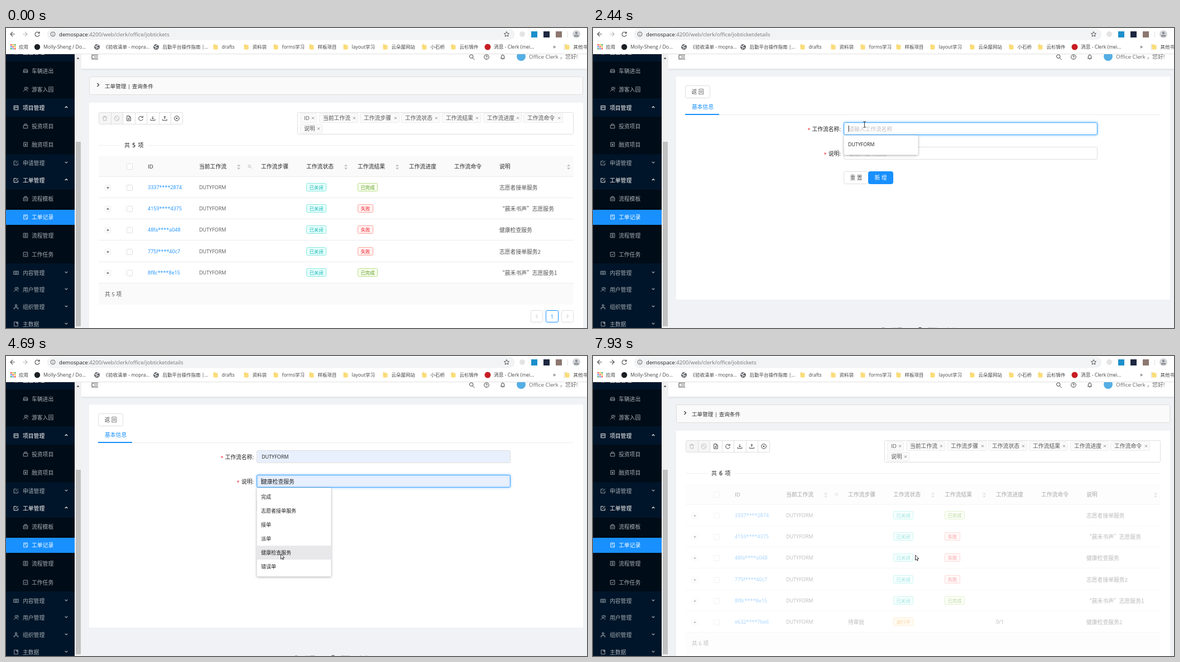
An HTML page with a canvas for the animation above (8000 ms loop, 1041x538 px).

```html
<!DOCTYPE html>
<html lang="zh">
<head>
<meta charset="utf-8">
<title>工单管理</title>
<style>
html, body { margin: 0; width: 100%; height: 100%; overflow: hidden; background: #fff; }
canvas { display: block; width: 1041px; height: 538px; }
</style>
</head>
<body>
<canvas id="stage" width="1041" height="538"></canvas>
<script>
const ctx = document.getElementById('stage').getContext('2d');
const LOOP = 8000, STEP = 77;
const BLUE = '#1890ff', LIGHT_BLUE = '#40a9ff', FILLED = '#e8f0fe';
const LINE = '#dedede', SOFT_LINE = '#ececec';
const LATIN = '"Open Sans"', CJK = '"Noto Sans CJK SC", "Noto Sans CJK"';

// Outline icons, drawn around their centre.
const ICONS = {
  back: 'M4 0H-4M0-4L-4 0L0 4',
  forward: 'M-4 0H4M0-4L4 0L0 4',
  reload: 'M3.4-2A4 4 0 1 0 4 1M4-4.5V-1.5H1',
  info: 'M4 0A4 4 0 1 1-4 0A4 4 0 1 1 4 0M0-.5V2.3M0-2.3V-1.4',
  star: 'M0-4.5L1.3-1.5L4.5-1.2L2.1 1L2.8 4.2L0 2.5L-2.8 4.2L-2.1 1L-4.5-1.2L-1.3-1.5Z',
  search: 'M2-1A3.2 3.2 0 1 1-4.4-1A3.2 3.2 0 1 1 2-1M1 1.5L4.5 5',
  help: 'M4.5 0A4.5 4.5 0 1 1-4.5 0A4.5 4.5 0 1 1 4.5 0M-1.4-1A1.4 1.4 0 1 1 0 .6V1.3M0 2.2V2.9',
  bell: 'M-4 3H4M-3 3V-1A3 3 0 0 1 3-1V3M-1 4.5H1M0-5V-4',
  fold: 'M-6-3.5H6M-1.5 0H6M-6 3.5H6M-3.5-1.8L-6 0L-3.5 1.8',
  trash: 'M-4-2.5H4M-3-2.5L-2.5 4H2.5L3-2.5M-1.5-2.5V-4H1.5V-2.5',
  ban: 'M4.5 0A4.5 4.5 0 1 1-4.5 0A4.5 4.5 0 1 1 4.5 0M-3-3L3 3',
  add: 'M-3.5-4.5H1L3.5-2V4.5H-3.5ZM1-4.5V-2H3.5M-1.8 1.2H1.8M0-.6V3',
  download: 'M-4 1.5V4H4V1.5M0-4V1.5M-2-.5L0 1.5L2-.5',
  upload: 'M-4 1.5V4H4V1.5M0 1.5V-4M-2-2L0-4L2-2',
  close: 'M4.5 0A4.5 4.5 0 1 1-4.5 0A4.5 4.5 0 1 1 4.5 0M-1.6-1.6L1.6 1.6M1.6-1.6L-1.6 1.6',
  cross: 'M-2.2-2.2L2.2 2.2M2.2-2.2L-2.2 2.2',
  plus: 'M-2 0H2M0-2V2',
  up: 'M-2.3 1.2L0-1.2L2.3 1.2',
  down: 'M-2.3-1.2L0 1.2L2.3-1.2',
  left: 'M1.5-3L-1.5 0L1.5 3',
  right: 'M-1.5-3L1.5 0L-1.5 3',
  car: 'M-4 3V0L-3-3H3L4 0V3ZM-4 0H4M-2.5 1.5H-1.5M1.5 1.5H2.5',
  user: 'M2-2A2 2 0 1 1-2-2A2 2 0 1 1 2-2M-4 4C-3 0 3 0 4 4M2-4A2 2 0 0 1 3 0',
  board: 'M-4-3.8H4V3.8H-4ZM-2-2V2M0-2V0M2-2V1',
  bag: 'M-4-1.5H4V4H-4ZM-2-1.5V-4H2V-1.5',
  money: 'M-3.5-4H3.5V3.5H-3.5ZM-1.7-2L0 0L1.7-2M0 0V2.3M-1.5.7H1.5',
  edit: 'M1-3.5H-4V4H3.5V0M-1 1L4-4',
  box: 'M-4-2H4V4H-4ZM-2-2V-4H2V-2M-2 0V2M0 0V2M2 0V2',
  log: 'M-3.5-4H3.5V4H-3.5ZM-1.7-2H1.7M-1.7 0H0M1 1L3 3',
  list: 'M-4-4H4V4H-4ZM-2-2H2M-2 0H2M-2 2H2',
  check: 'M-4-4H4V4H-4ZM-2 0L-.5 1.5L2-1.5',
  book: 'M0-3H-4.5V3H4.5V-3H0V3M-3-1H-1.5M1.5-1H3M-3 1H-1.5M1.5 1H3',
  tree: 'M-1.5-4H1.5V-1H-1.5ZM0-1V1.5M-3.5 4V1.5H3.5V4M-4.5 4H-2.5M2.5 4H4.5',
  file: 'M-3.5-4H3.5V4H-3.5ZM1-4V-1H2.5V-4'
};
for (const name in ICONS) ICONS[name] = new Path2D(ICONS[name]);

const ARROW = new Path2D('M0 0V9.2L2.1 7.2L3.4 10.2L4.8 9.6L3.5 6.6H6.4Z');
const HAND = new Path2D('M-1 1Q0-.8 1 1V5L4.6 6Q5.8 6.4 5.5 8L4.6 10.5V12.2H-1V10.5L-3.6 7.3Q-3.2 5.8-1 7.6Z');

function text(s, x, y, color = '#555', size = 9.8, weight = 400, align = 'left') {
  const family = /“/.test(s) ? [CJK, LATIN] : [LATIN, CJK];
  ctx.font = `${weight} ${size}px ${family.join(', ')}, sans-serif`;
  ctx.textAlign = align;
  ctx.fillStyle = color;
  ctx.fillText(s, x, y + size * 0.37);
  return ctx.measureText(s).width;
}

function rect(x, y, w, h, color) {
  ctx.fillStyle = color;
  ctx.fillRect(x, y, w, h);
}

function box(x, y, w, h, fill, stroke, r = 2) {
  ctx.beginPath();
  ctx.roundRect(x + 0.5, y + 0.5, w - 1, h - 1, r);
  if (fill) { ctx.fillStyle = fill; ctx.fill(); }
  if (stroke) { ctx.strokeStyle = stroke; ctx.lineWidth = 1; ctx.stroke(); }
}

function dot(x, y, r, color) {
  ctx.beginPath();
  ctx.arc(x, y, r, 0, Math.PI * 2);
  ctx.fillStyle = color;
  ctx.fill();
}

function icon(name, x, y, color = '#555', scale = 1, width = 1) {
  ctx.save();
  ctx.translate(x, y);
  ctx.scale(scale, scale);
  ctx.strokeStyle = color;
  ctx.lineWidth = width / scale;
  ctx.stroke(ICONS[name]);
  ctx.restore();
}

function shadow(color, blur, y, draw) {
  ctx.save();
  ctx.shadowColor = color;
  ctx.shadowBlur = blur;
  ctx.shadowOffsetY = y;
  draw();
  ctx.restore();
}

const inside = (p, x, y, w, h) => p.x >= x && p.x < x + w && p.y >= y && p.y < y + h;
const between = (t, a, b) => t >= a && t < b;

// Pointer way points: time, x, y.
const PATH = [
  [240, 939, 522], [1020, 228, 167], [1100, 224, 164], [1730, 224, 164],
  [2270, 486, 173], [2610, 486, 173], [2900, 481, 211], [3060, 481, 211],
  [3370, 497, 222], [3520, 497, 222], [3900, 496, 264], [4050, 496, 264],
  [4210, 494, 284], [4310, 494, 284], [4690, 492, 355], [4790, 492, 355],
  [5070, 535, 224], [5610, 535, 224], [5910, 517, 269], [6990, 517, 269],
  [7440, 192, 118], [7690, 192, 118], [7900, 577, 357]
];

function pointerAt(t) {
  if (t < PATH[0][0] || between(t, 5150, 5610)) return null;
  let i = PATH.length - 1;
  while (PATH[i][0] > t) i--;
  const [t0, x0, y0] = PATH[i];
  const [t1, x1, y1] = PATH[i + 1] || [t0 + 1, x0, y0];
  const p = Math.min(1, (Math.floor((t - t0) / STEP) + 1) * STEP / (t1 - t0));
  const e = p * p * (3 - 2 * p);
  return { x: Math.round(x0 + (x1 - x0) * e), y: Math.round(y0 + (y1 - y0) * e) };
}

function drawPointer(p, kind) {
  ctx.save();
  ctx.translate(p.x + 0.5, p.y);
  ctx.lineWidth = 0.9;
  ctx.lineJoin = 'round';
  ctx.strokeStyle = '#222';
  if (kind === 'text') {
    ctx.stroke(new Path2D('M-2.5-5H2.5M0-5V5M-2.5 5H2.5'));
  } else {
    const shape = kind === 'hand' ? HAND : ARROW;
    ctx.fillStyle = '#fff';
    ctx.fill(shape);
    ctx.stroke(shape);
  }
  ctx.restore();
}

const BOOKMARKS = [
  ['globe', 163, '《验收清单 - mopra...'], ['globe', 269, '后勤平台操作指南 |...'],
  ['folder', 375, 'drafts'], ['folder', 430, '资料袋'], ['folder', 483, 'forms学习'],
  ['folder', 547, '样板项目'], ['folder', 608, 'layout学习'], ['folder', 679, '云朵屋网站'],
  ['folder', 749, '小石桥'], ['folder', 801, '云杉铸件'], ['folder', 1005, '其他书签']
];

function drawBrowser(t) {
  rect(0, 0, 1041, 47, '#fff');
  box(73, 1, 839, 21, '#f1f3f4', null, 10);
  icon('back', 12, 11, '#555', 1, 1.2);
  icon('forward', 34, 11, t >= 7530 ? '#555' : '#bbb', 1, 1.2);
  icon('reload', 56, 11, '#555', 1, 1.2);
  icon('info', 84, 11, '#666');
  const host = 'demospace', form = between(t, 1400, 7530);
  const w = text(host, 95, 11, '#222', 9.6);
  text(':4200/web/clerk/office/' + (form ? 'jobticketdetails' : 'jobtickets'), 95 + w, 11, '#777', 9.6);
  icon('star', 897, 11, '#555');
  dot(925, 11, 5, '#e4e4e4');
  rect(941, 6, 11, 11, '#1c8fcb');
  rect(963, 6, 11, 11, '#1d2740');
  rect(985, 6, 11, 11, '#8c7770');
  rect(1006, 6, 1, 11, '#ddd');
  dot(1022, 11, 7, '#d3d5d9');
  dot(1022, 9, 2.3, '#8b8f95');
  rect(1018, 12.5, 8, 3, '#8b8f95');

  const colors = ['#e8453c', '#f4b52c', '#3aa757', '#4688f1'];
  for (let i = 0; i < 9; i++) rect(8 + i % 3 * 3.5, 29 + Math.floor(i / 3) * 3.5, 2.4, 2.4, colors[i % 4]);
  text('应用', 23, 34, '#444', 8.5);
  dot(56, 34, 5.2, '#1b1f23');
  text('Molly-Sheng / Do...', 67, 34, '#444', 8.7);
  for (const [kind, x, label] of BOOKMARKS) {
    if (kind === 'globe') {
      dot(x, 34, 5, '#5f6368');
      ctx.strokeStyle = '#fff';
      ctx.lineWidth = 1.3;
      ctx.stroke(new Path2D(`M${x - 4} 32q3 3 4 0t3-1M${x - 2} 37q2-3 5-1`));
    } else {
      box(x - 4, 29, 5, 4, '#f0cf62', null, 1);
      box(x - 4, 30, 9, 9, '#fbdc78', null, 1);
    }
    text(label, x + 11.5, 34, '#444', 8.5);
  }
  dot(863, 34, 5.5, '#c71d23');
  text('消息 - Clerk (mei...', 874, 34, '#444', 8.7);
  text('»', 980, 33, '#444', 10);
  rect(1000, 28, 1, 12, '#ddd');
  rect(0, 46, 1041, 1, '#e0e0e0');
}

// icon, label, y, level ('sub', 'open' or 'closed')
const MENU = [
  ['file', '园区管理', 43, 'open'], ['car', '车辆进出', 77, 'sub'], ['user', '游客入园', 110, 'sub'],
  ['board', '项目管理', 143, 'open'], ['bag', '投资项目', 176, 'sub'], ['money', '融资项目', 209, 'sub'],
  ['edit', '申请管理', 242, 'closed'], ['edit', '工单管理', 273, 'open'], ['box', '流程模板', 306, 'sub'],
  ['log', '工单记录', 339, 'sub'], ['list', '流程管理', 372, 'sub'], ['check', '工作任务', 406, 'sub'],
  ['book', '内容管理', 439, 'closed'], ['user', '用户管理', 469, 'closed'],
  ['tree', '组织管理', 500, 'closed'], ['file', '主数据', 531, 'closed']
];

function drawFrame() {
  rect(0, 46, 1041, 492, '#f0f2f5');
  shadow('rgba(0,21,41,.12)', 4, 1, () => rect(135, 46, 906, 27, '#fff'));
  icon('fold', 159, 52, '#333');
  icon('search', 835, 52, '#444');
  icon('help', 861, 52, '#444', 0.95);
  icon('bell', 890, 52, '#444', 0.9);
  dot(923, 51, 8, '#55aee4');
  text('Office Clerk ，您好!', 937, 51, '#666');

  rect(0, 46, 123, 492, '#001529');
  for (const [y, h] of [[60, 66], [159, 67], [290, 132]]) rect(0, y, 123, h, '#000c17');
  rect(0, 326, 123, 27, BLUE);
  for (const [name, label, y, level] of MENU) {
    const sub = level === 'sub', bright = level === 'open' || y === 339;
    const color = bright ? '#fff' : '#a6adb4';
    icon(name, sub ? 35 : 18, y, color, 0.95, 0.9);
    text(label, sub ? 46 : 30, y, color, 9.8, level === 'open' ? 500 : 400);
    if (!sub) icon(level === 'open' ? 'up' : 'down', 108, y - 1, color, 1, 1.2);
  }
  rect(123, 46, 12, 492, '#f1f1f1');
  rect(125, 204, 9, 331, '#c1c1c1');
  ctx.fillStyle = '#505050';
  ctx.fill(new Path2D('M126.5 55.5L129 52.5L131.5 55.5Z'));
}

const TOOLS = ['trash', 'ban', 'add', 'reload', 'download', 'upload', 'close'];
const COLUMNS = [
  [254, 'ID'], [346, '当前工作流'], [457, '工作流步骤'], [538, '工作流状态'],
  [630, '工作流结果'], [722, '工作流进度'], [803, '工作流命令'], [884, '说明']
];
const CHIPS = [[527, 30], [561, 70], [634, 71], [708, 70], [781, 70], [855, 69], [927, 71], [527, 40]];
const BADGES = {
  已关闭: ['#e6fffb', '#87e8de', '#13b5b8'],
  已完成: ['#f8ffec', '#b9dd8c', '#5b9a24'],
  失败: ['#fff1f0', '#ffa39e', '#f5222d'],
  进行中: ['#fff7e6', '#ffd591', '#fa8c16']
};
const ROWS = [
  ['3337****2874', '已完成', '志愿者接单服务'],
  ['4159****4375', '失败', '“晨禾书声”志愿服务'],
  ['48fa****a048', '失败', '健康检查服务'],
  ['775f****40c7', '失败', '志愿者接单服务2'],
  ['8f8c****8e15', '已完成', '“晨禾书声”志愿服务1'],
  ['e632****7be6', '', '健康检查服务2']
];

function badge(label, x, y) {
  const [fill, stroke, color] = BADGES[label], w = label.length === 3 ? 36 : 28;
  box(x, y - 8, w, 15, fill, stroke);
  text(label, x + w / 2, y, color, 8.4, 400, 'center');
}

function sorter(x, y) {
  ctx.fillStyle = '#bfbfbf';
  ctx.fill(new Path2D(`M${x - 3} ${y - 1}h6l-3-3.5zM${x - 3} ${y + 1.5}h6l-3 3.5z`));
}

function drawTable(count) {
  rect(166, 230, 851, 37, '#fafafa');
  box(216, 243, 11, 11, '#fff', LINE, 1);
  for (const [x, label] of COLUMNS) text(label, x, 248, '#262626', 9.8, x === 254 ? 500 : 400);
  for (const x of [417, 609, 701, 1008]) sorter(x, 249);
  icon('search', 437, 248.5, '#bbb', 0.7);
  rect(166, 266, 851, 1, SOFT_LINE);
  ROWS.slice(0, count).forEach(([id, result, note], i) => {
    const y = Math.round(286 + i * 38.2);
    box(177, y - 5, 11, 11, '#fff', SOFT_LINE, 1);
    icon('plus', 182.5, y + 0.5, '#555');
    box(216, y - 5, 11, 11, '#fff', LINE, 1);
    text(id, 254, y, BLUE, 9);
    text('DUTYFORM', 346, y, '#555', 9);
    badge(result ? '已关闭' : '进行中', 538, y);
    if (result) badge(result, 630, y);
    else {
      text('待审批', 457, y);
      text('0/1', 722, y, '#555', 9.3);
    }
    text(note, 884, y);
    rect(166, y + 18, 851, 1, SOFT_LINE);
  });
  const foot = Math.round(267 + count * 38.2);
  rect(166, foot, 851, 38, '#fafafa');
  text(`共 ${count} 项`, 177, foot + 19);
  const y = foot + 48;
  box(940, y, 22, 22, '#fff', LINE);
  box(967, y, 23, 22, '#fff', BLUE);
  box(995, y, 22, 22, '#fff', LINE);
  icon('left', 951, y + 11, '#bbb');
  icon('right', 1006, y + 11, '#bbb');
  text('1', 978.5, y + 11, BLUE, 9.5, 500, 'center');
}

function drawList(t) {
  const reopened = t >= 7690, loaded = !reopened || t >= 7850;
  const count = reopened && loaded ? 6 : 5;
  const hover = between(t, 1100, 1400);
  box(149, 87, 885, 33, '#fafafa', LINE);
  icon('right', 165, 102, '#333', 1, 1.2);
  text('工单管理 | 查询条件', 177, 104, '#333', 9.6);
  rect(149, 134, 885, 404, '#fff');

  box(166, 151, 151, 22, '#fff', LINE);
  rect(167, 152, 42, 20, '#f5f5f5');
  TOOLS.forEach((name, i) => {
    const x = 166 + i * 21.5;
    if (i) rect(Math.round(x), 151, 1, 22, LINE);
    icon(name, x + 11, 162, i < 2 ? '#bbb' : hover && i === 2 ? LIGHT_BLUE : '#444', 0.95);
  });
  if (hover) box(208, 151, 23, 22, null, LIGHT_BLUE, 0);

  box(522, 151, 495, 40, '#fff', LINE);
  if (loaded) CHIPS.forEach(([x, w], i) => {
    const y = i === 7 ? 172 : 153;
    box(x, y, w, 17, '#fafafa', SOFT_LINE);
    text(COLUMNS[i][1], x + 7, y + 8.5);
    icon('cross', x + w - 7, y + 8.5, '#888', 0.9);
  });

  rect(166, 210, 39, 1, SOFT_LINE);
  rect(254, 210, 763, 1, SOFT_LINE);
  text('共', 212, 210, '#222', 10);
  text(count, 229, 210, '#222', 10, 600, 'center');
  text('项', 246.5, 210, '#222', 10, 400, 'right');
  if (loaded) {
    ctx.globalAlpha = !reopened ? 1 : t < 7930 ? 0.25 : 0.4;
    drawTable(count);
    ctx.globalAlpha = 1;
  }
  if (between(t, 1180, 1400)) {
    ctx.globalAlpha = t < 1250 ? 0.5 : 1;
    box(205, 180, 29, 22, '#595959', null, 3);
    ctx.fill(new Path2D('M216 181L219.5 176.5L223 181Z'));
    text('新增', 219.5, 191.5, '#fff', 9.8, 400, 'center');
    ctx.globalAlpha = 1;
  }
}

const OPTIONS = ['完成', '志愿者接单服务', '接单', '派单', '健康检查服务', '错误单'];

function drawInput(y, { value, hint, focus, filled, caret, color = '#222' }) {
  const fill = filled ? FILLED : '#fff';
  if (focus) shadow('rgba(24,144,255,.45)', 4, 0, () => box(449, y, 455, 23, fill, LIGHT_BLUE));
  else box(449, y, 455, 23, fill, LINE);
  const size = /^[A-Z]/.test(value) ? 9 : 9.8;
  const w = text(value || hint, 458, y + 12, value ? color : '#bfbfbf', size);
  if (focus) rect(caret === 'end' && value ? 458 + w : 457.5, y + 6, 1, 11, '#222');
}

function drawOptions(y, h, first, step, labels, hover) {
  shadow('rgba(0,0,0,.35)', 4, 1, () => box(449, y, 134, h, '#fff', null, 2));
  labels.forEach((label, i) => {
    const cy = first + i * step;
    if (i === hover) rect(449, cy - 12.4, 133, 25, '#e8e8eb');
    text(label, 457, cy, '#222', label === 'DUTYFORM' ? 8.8 : 9);
  });
}

function button(label, x, y, w, { color = '#555', fill = '#fff', stroke = LINE } = {}) {
  box(x, y, w, 23, fill, stroke, 3);
  text(label, x + w / 2, y + 11.5, color, 9.8, 400, 'center');
}

// Draws the form page and returns the pointer kind.
function drawForm(t, p) {
  const saved = t >= 6240;
  const firstOpen = between(t, 2360, 2980), secondOpen = between(t, 3520, 4780);
  const pickName = firstOpen && p && inside(p, 449, 197, 134, 25);
  const picked = secondOpen && p && inside(p, 449, 241, 134, 149) ? Math.floor((p.y - 240.6) / 24.9) : -1;
  const overBack = p && inside(p, 166, 104, 44, 22);
  const overSave = p && inside(p, 494, 257, 44, 23);

  rect(149, 87, 885, 400, '#fff');
  button('返 回', 165, 103, 45, overBack ? { color: LIGHT_BLUE, stroke: LIGHT_BLUE } : {});
  rect(166, 155, 851, 1, SOFT_LINE);
  rect(165, 154, 61, 2, BLUE);
  text('基本信息', 177, 141.5, BLUE);
  if (saved) text('扩展属性', 260, 141.5);
  for (const [label, y, star] of [['工作流名称:', 181, 387], ['说明:', 225, 416]]) {
    text('*', star, y + 2, '#f5222d', 9, 400, 'center');
    text(label, 444, y, '#222', 9.8, 400, 'right');
  }

  const named = t >= 2980 || pickName;
  drawInput(169, {
    value: named ? 'DUTYFORM' : '', hint: '请输入工作流名称',
    focus: between(t, 2280, 3440), filled: named, caret: t >= 2980 ? 'end' : 'start'
  });
  const typed = t >= 5150;
  const value = t >= 4780 ? '健康检查服务' + (typed ? '2' : '') : OPTIONS[picked] || '';
  drawInput(213, {
    value, hint: '请输入说明信息', focus: between(t, 3440, 6090),
    filled: value && !typed, caret: t >= 4780 ? 'end' : 'start', color: t >= 4780 ? '#555' : '#222'
  });
  button('重 置', 449, 257, 45);
  const fill = overSave || t >= 6090 ? LIGHT_BLUE : BLUE;
  button(saved ? '更 新' : '新 增', 493, 257, 45, { color: '#fff', fill, stroke: fill });
  if (firstOpen) drawOptions(192, 36, 209, 25, ['DUTYFORM'], pickName ? 0 : -1);
  if (secondOpen) drawOptions(236, 160, 253, 24.9, OPTIONS, picked);

  dot(520, 541, 4, '#999');
  text('首页', 535, 541, '#888', 9.5);
  dot(586, 541, 4.5, '#666');
  text('帮助 © 条款', 600, 541.5, '#999', 9.5);

  if (overBack || overSave) return 'hand';
  const overField = p && (inside(p, 449, 169, 455, 23) || inside(p, 449, 213, 455, 23));
  return overField && !(firstOpen && p.y > 192) ? 'text' : 'arrow';
}

function draw(t) {
  const p = pointerAt(t);
  let kind = between(t, 1100, 1400) ? 'hand' : 'arrow';
  drawFrame();
  if (between(t, 1400, 7690)) kind = drawForm(t, p);
  else drawList(t);
  drawBrowser(t);
  if (p) drawPointer(p, kind);
}

let start;
function tick(now) {
  start ??= now;
  draw((now - start) % LOOP);
  requestAnimationFrame(tick);
}
requestAnimationFrame(tick);
</script>
</body>
</html>
```
